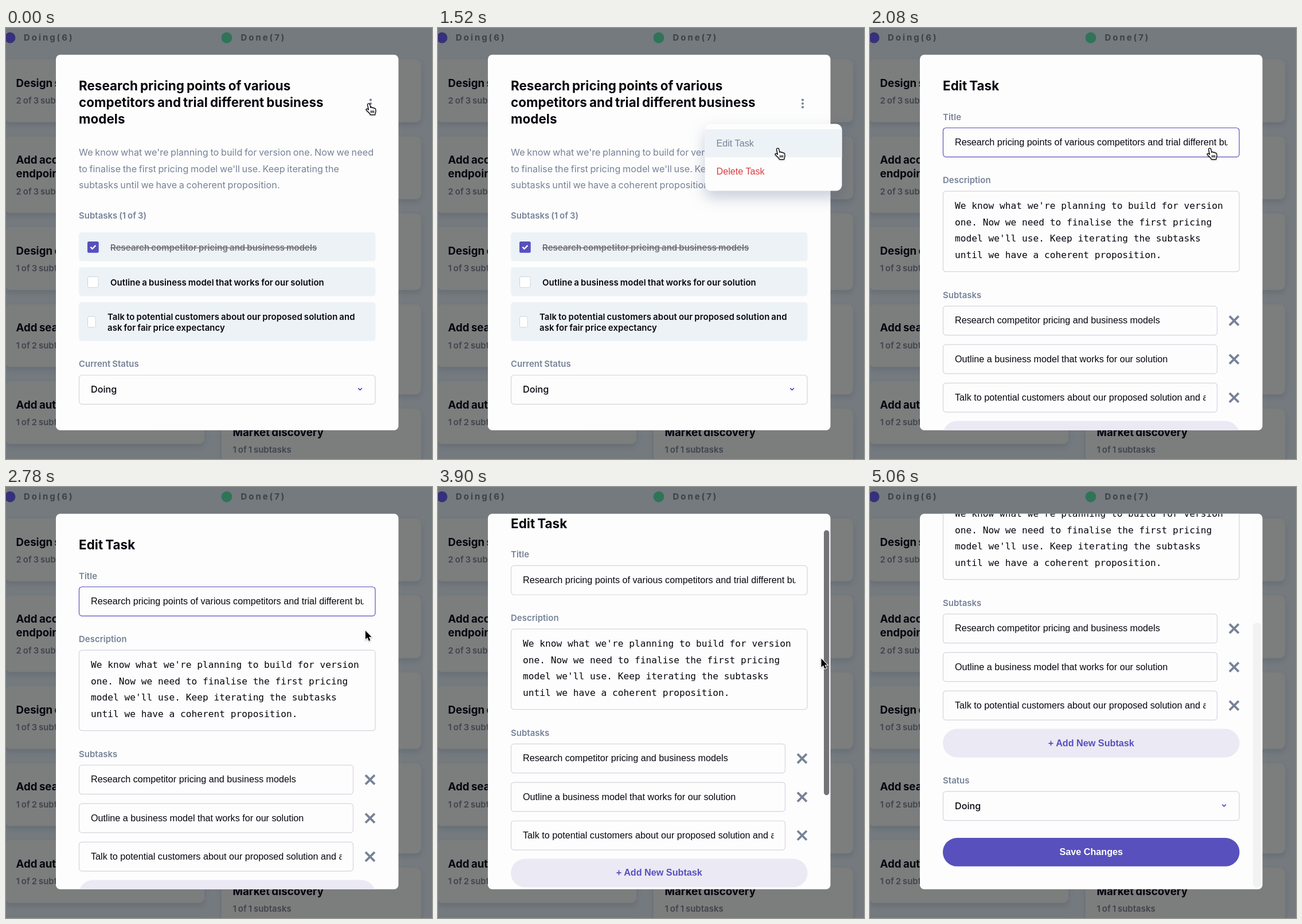
These frames come from a looping animation (743x753 px, 5080 ms). An HTML page:

```html
<!DOCTYPE html>
<html lang="en">
<head>
<meta charset="utf-8">
<title>Edit a task</title>
<style>
html, body { margin: 0; width: 100%; height: 100%; overflow: hidden; background: #747a7e; }
svg { display: block; width: 100%; height: 100%; }
text { font-family: Inter, sans-serif; font-optical-sizing: none; word-spacing: -.06em; fill: #05050f; white-space: pre; }
.title { font-size: 22.4px; font-weight: 700; letter-spacing: .002em; }
.body { font-size: 16.2px; letter-spacing: .002em; fill: #768297; }
.label { font-size: 14.9px; font-weight: 600; letter-spacing: .004em; fill: #768297; }
.row { font-size: 14.9px; font-weight: 600; letter-spacing: .008em; }
.done { fill: #707175; text-decoration: line-through; }
.pick { font-size: 16.2px; font-weight: 500; }
.head { font-size: 14.9px; font-weight: 700; letter-spacing: 3px; fill: #3c4049; }
.card { font-size: 18.7px; font-weight: 700; }
.sub { font-size: 14.9px; font-weight: 600; letter-spacing: .004em; fill: #3f444d; }
.ui { font: 16.18px "Liberation Sans", Arial, sans-serif; word-spacing: 0; }
.mono { font: 16.19px "DejaVu Sans Mono", monospace; word-spacing: 0; }
.button { font-weight: 700; text-anchor: middle; }
.shade { filter: drop-shadow(0 5px 4px rgba(40, 50, 75, .16)); }
.menu { filter: drop-shadow(0 12px 13px rgba(54, 78, 126, .27)); }
.cursor { filter: drop-shadow(0 1px 1px rgba(0, 0, 0, .3)); }
</style>
</head>
<body>
<svg id="stage" viewBox="0 0 743 753" preserveAspectRatio="none"></svg>
<script>
const PERIOD = 5080, MAX_SCROLL = 264;
const PAPER = '#fdfdfd', TINT = '#edf2f7', GREY = '#768297', PURPLE = '#5850bd', EDGE = '#d3d6df';

const rect = (x, y, w, h, r, fill, extra = '') =>
  `<rect x="${x}" y="${y}" width="${w}" height="${h}" rx="${r}" fill="${fill}" ${extra}/>`;
const circle = (x, y, r, fill) => `<circle cx="${x}" cy="${y}" r="${r}" fill="${fill}"/>`;
const text = (x, y, cls, str, extra = '') => `<text x="${x}" y="${y}" class="${cls}" ${extra}>${str}</text>`;
const lines = (x, y, step, cls, list) => list.map((s, i) => text(x, y + i * step, cls, s)).join('');
const box = (y, w, h, extra = '') =>
  rect(127.5, y + .5, w - 1, h - 1, 5, PAPER, `stroke="${EDGE}" stroke-width="1.2" ${extra}`);

// Board behind the dialog
function card(x, y, h, names, note) {
  return rect(x, y, 348, h, 9.5, '#7c7d7d', 'class="shade"') +
    lines(x + 19.5, y + 47.5, 23.8, 'card', names) +
    text(x + 19.5, y + 77 + (names.length - 1) * 24, 'sub', note);
}
function column(x, cards) {
  let y = 55;
  return cards.map(([names, note]) => {
    const h = 85.8 + names.length * 24, top = y;
    y += h + 24.7;
    return card(x, top, h, names, note);
  }).join('');
}
const board = rect(0, 0, 743, 753, 0, '#747a7e') +
  circle(7, 17, 9.4, '#37307a') + text(31, 22, 'head', 'Doing(6)') +
  circle(385, 17, 9.4, '#2f7457') + text(409.5, 22, 'head', 'Done(7)') +
  column(-2, [
    [['Design settings screen'], '2 of 3 subtasks'],
    [['Add account management', 'endpoints'], '2 of 3 subtasks'],
    [['Design onboarding flow'], '1 of 3 subtasks'],
    [['Add search endpoints'], '1 of 2 subtasks'],
    [['Add authentication'], '1 of 2 subtasks'],
    [['Research pricing'], '1 of 3 subtasks']
  ]) +
  column(376, [
    [['Conduct wireframe tests'], '1 of 1 subtasks'],
    [['Create wireframes'], '1 of 1 subtasks'],
    [['Review results of', 'usability tests'], '3 of 3 subtasks'],
    [['Create prototypes', 'and test them', 'again'], '3 of 3 subtasks'],
    [['Market discovery'], '1 of 1 subtasks']
  ]);

const select = y => box(y, 517.5, 51.8) + text(148, y + 31.3, 'pick', 'Doing') +
  `<path d="M614.2 ${y + 23.2}l3.3 3.3 3.3-3.3" fill="none" stroke="${PURPLE}" stroke-width="1.8"/>`;

// Task view
const check = (y, w) => rect(142.5, y, w, 19, 2.5, '#fff', 'stroke="#cfd3d6"');
const taskView = lines(127, 109.3, 28.8, 'title', [
    'Research pricing points of various', 'competitors and trial different business', 'models']) +
  [125.7, 132, 138.3].map(y => circle(636, y, 2.1, GREY)).join('') +
  lines(127, 222.8, 28.7, 'body', [
    "We know what we're planning to build for version one. Now we need",
    "to finalise the first pricing model we'll use. Keep iterating the",
    'subtasks until we have a coherent proposition.']) +
  text(127, 333.3, 'label', 'Subtasks (1 of 3)') +
  rect(127, 357, 517.5, 50.5, 5, TINT) + rect(127, 418, 517.5, 50.5, 5, TINT) + rect(127, 479, 517.5, 68, 5, TINT) +
  rect(142, 373, 19.7, 19.7, 2.5, PURPLE) +
  '<path d="M147.4 382.6l3.2 3.2 5.8-6" fill="none" stroke="#fff" stroke-width="2.4"/>' +
  check(434.4, 18.7) + check(504, 13.8) +
  text(182, 388.8, 'row done', 'Research competitor pricing and business models') +
  text(182, 449.8, 'row', 'Outline a business model that works for our solution') +
  lines(177, 510.3, 18.7, 'row', [
    'Talk to potential customers about our proposed solution and', 'ask for fair price expectancy']) +
  text(127, 592.3, 'label', 'Current Status') + select(606);

// Edit form
const subtask = (str, i) => {
  const y = 485.4 + i * 67.2;
  return box(y, 479, 51.8) + text(148, y + 31, 'ui', str, 'clip-path="url(#short)"') +
    `<path d="M627 ${y + 18}l16 16m0-16l-16 16" stroke="${GREY}" stroke-width="3.8"/>`;
};
const editForm = text(127, 109.3, 'title', 'Edit Task') +
  text(127, 160.5, 'label', 'Title') + box(174, 517.5, 51.8, 'id="field"') +
  text(148, 205, 'ui', 'Research pricing points of various competitors and trial different business models',
    'clip-path="url(#long)"') +
  text(127, 271.3, 'label', 'Description') + box(284.7, 517.5, 141.5) +
  lines(148, 316, 28.7, 'mono', [
    "We know what we're planning to build for version", 'one. Now we need to finalise the first pricing',
    "model we'll use. Keep iterating the subtasks", 'until we have a coherent proposition.']) +
  text(127, 471.8, 'label', 'Subtasks') +
  ['Research competitor pricing and business models',
    'Outline a business model that works for our solution',
    'Talk to potential customers about our proposed solution and ask for fair price expectancy'
  ].map(subtask).join('') +
  rect(127, 686.6, 517.5, 49.8, 24.9, '#ebe9f4') +
  text(385.8, 716.5, 'ui button', '+ Add New Subtask', `style="fill:${PURPLE}"`) +
  text(127, 781.6, 'label', 'Status') + select(795.4) +
  rect(127, 877, 517.5, 49.8, 24.9, PURPLE) +
  text(385.8, 907, 'ui button', 'Save Changes', 'style="fill:#fff"');

const menu = rect(465.5, 167.5, 239, 117, 10, PAPER, 'class="menu"') +
  rect(465.5, 177, 239, 48.7, 0, TINT, 'id="hover"') +
  text(485.5, 207.3, 'ui', 'Edit Task', `style="fill:${GREY}"`) +
  text(485.5, 255.8, 'ui', 'Delete Task', 'style="fill:#d93c41"');

const hand = `<g id="hand" transform="translate(-5 -1)" stroke="#000" stroke-width="1.3" stroke-linejoin="round">
  <path fill="#fff" d="M5 1.2C6.4.8 7.3 1.6 7.6 2.8L9 8.4C9.6 7 11.6 7.2 12 8.8 12.8 7.6 14.5 8 14.8 9.6 15.8 8.8
    17.3 9.4 17.6 11 18.2 14 18.2 15 17.2 17.5L16.6 20.6H8.4L7.6 18.6C6.4 16.6 3 14.4 1.4 12.4.4 11 2 9.6 3.6 10.6
    L5.4 12 3.6 3.4C3.4 2.2 4 1.4 5 1.2Z"/><path d="M9.6 13.2v4M12 13.2v4M14.4 13.2v4"/></g>`;
const arrow = `<path id="arrow" d="M.5.8V15.8L4 12.6 6.5 18.6 9 17.5 6.5 11.7H11.2Z"
  stroke="#fff" stroke-width="2" paint-order="stroke"/>`;

const stage = document.getElementById('stage');
stage.innerHTML = `<defs>
    <clipPath id="dialog">${rect(87, 46.7, 597.5, 656, 7.5, '#000')}</clipPath>
    <clipPath id="long">${rect(148, 180, 476, 40, 0, '#000')}</clipPath>
    <clipPath id="short">${rect(148, 480, 437.5, 200, 0, '#000')}</clipPath>
  </defs>${board}
  <g clip-path="url(#dialog)">${rect(87, 46, 598, 658, 0, PAPER)}
    <g id="view">${taskView}</g><g id="edit">${editForm}</g>
    <g id="bar">${rect(664, 46, 21, 658, 0, '#eee', 'id="track"')}${rect(673, 49, 9.3, 463, 4.6, '#737378', 'id="thumb"')}</g>
  </g>
  <g id="menu">${menu}</g>
  <g id="cursor" class="cursor">${hand}${arrow}</g>`;

const el = {};
stage.querySelectorAll('[id]').forEach(node => el[node.id] = node);
const show = (name, on) => el[name].setAttribute('visibility', on ? 'inherit' : 'hidden');

const progress = (t, from, to) => Math.min(1, Math.max(0, (t - from) / (to - from)));
const ease = (t, from, to) => { const p = progress(t, from, to); return p * p * (3 - 2 * p); };

// Each move: start, end, dx, dy
const moves = [[700, 1300, -40, 78], [2500, 3100, 76, 89], [4450, 4850, 102, 0]];

function draw(t) {
  let x = 632, y = 132;
  for (const [from, to, dx, dy] of moves) {
    const p = ease(t, from, to);
    x += dx * p;
    y += dy * p;
  }
  const editing = t >= 1720, menuOpen = t >= 520 && !editing;
  const pointing = t < 2500 && (y < 143 || y > 177);
  show('view', !editing);
  show('edit', editing);
  show('menu', menuOpen);
  show('hover', menuOpen && y > 177);
  show('hand', pointing);
  show('arrow', !pointing);
  el.cursor.setAttribute('transform', `translate(${x} ${y})`);
  el.field.setAttribute('stroke', t < 3200 ? PURPLE : EDGE);

  const scroll = MAX_SCROLL * ease(t, 3795, 4245), wide = x > 669 && t > 4450;
  el.edit.setAttribute('transform', `translate(0 ${-scroll})`);
  show('bar', t >= 3795);
  show('track', wide);
  el.bar.setAttribute('opacity', 1 - progress(t, 4800, 5082));
  el.thumb.setAttribute('x', wide ? 668 : 673);
  el.thumb.setAttribute('width', wide ? 14.3 : 9.3);
  el.thumb.setAttribute('rx', wide ? 7 : 4.6);
  el.thumb.setAttribute('y', 49 + scroll * .712);
}

const start = performance.now();
function tick() {
  draw((performance.now() - start) % PERIOD);
  requestAnimationFrame(tick);
}
draw(0);
requestAnimationFrame(tick);
</script>
</body>
</html>
```
